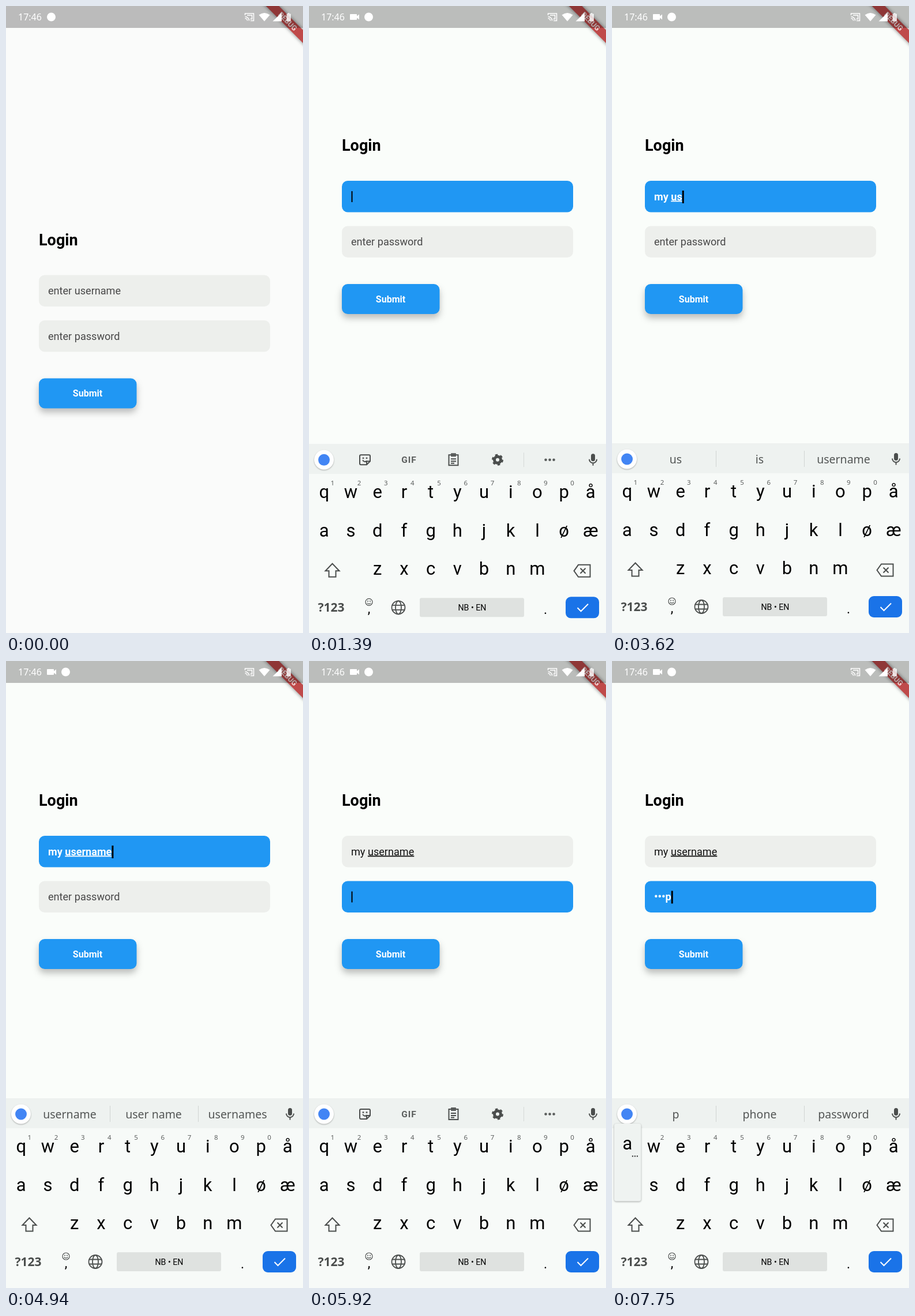
An HTML page that plays this animation: 515 by 1087 pixels, repeating every 8 s.

```html
<!DOCTYPE html>
<html lang="en">
<head>
<meta charset="utf-8">
<title>Login form</title>
<style>
  html, body { margin: 0; width: 100%; height: 100%; overflow: hidden; background: #fafbfa; }
  svg { display: block; width: 100vw; height: 100vh; }
  text { font-family: Roboto, sans-serif; white-space: pre; }
  .noto { font-family: "Noto Sans", sans-serif; }
  .mid { text-anchor: middle; }
  .bold { font-weight: 700; }
  .line { fill: none; stroke: #4b4e4d; stroke-width: 2; }
  .hint { fill: #484848; font-size: 18.1px; }
  .entry { font-size: 18.1px; }
  .under { text-decoration: underline; text-decoration-thickness: 1px; }
  .raised { filter: drop-shadow(0 7px 6px rgba(0, 0, 0, .25)); }
  .popup { filter: drop-shadow(0 1.5px 1.5px rgba(0, 0, 0, .35)); }
</style>
</head>
<body>
<svg viewBox="0 0 515 1087" preserveAspectRatio="none">
  <rect id="page" width="515" height="1087"/>

  <g id="form">
    <text class="bold" x="57" y="414.5" font-size="27">Login</text>
    <g id="fields"></g>
    <rect class="raised" x="57" y="645.5" width="169.5" height="52" rx="10" fill="#2097f3"/>
    <text class="bold mid" x="141.5" y="677" font-size="16" fill="#fff">Submit</text>
  </g>

  <g transform="translate(488.5 26.5) rotate(45)">
    <rect x="-70" y="-8" width="140" height="16" fill="#bf4a4a" style="filter:drop-shadow(0 0 3px rgba(0,0,0,.5))"/>
    <text class="bold mid" y="4.5" font-size="12.5" fill="#f4e4e4">DEBUG</text>
  </g>

  <rect width="515" height="38" fill="#000" fill-opacity=".255"/>
  <g fill="#fff">
    <text class="noto" x="21" y="25" font-size="16">17:46</text>
    <path id="camera" d="M72 14h10q1 0 1 1v2.500l4-3v9l-4-3v2.500q0 1-1 1h-10q-1 0-1-1v-8q0-1 1-1z"/>
    <circle id="badge" cy="19" r="7.500"/>
    <path d="M414.500 16v-3h15v12.500h-5.500M414.500 18.500a7 7 0 0 1 7 7M414.500 21.500a4 4 0 0 1 4 4M418 16h8.500v6.500h-3" fill="none" stroke="#fff" stroke-width="1.500"/>
    <path d="M438.500 15.500q9.500-7 19 0l-9.500 11z"/>
    <path d="M478 11.500v15h-15.500z"/>
    <path d="M486.500 13.500h2v-1.500h3v1.500h2.500v13h-7.500z" fill-opacity=".8"/>
  </g>

  <g id="keyboard">
    <rect y="758" width="515" height="340" fill="#f7faf8"/>
    <rect y="758" width="515" height="52" fill="#eef2f0"/>
    <circle cx="26" cy="785.500" r="17" fill="#fff" style="filter:drop-shadow(0 1px 1px rgba(0,0,0,.3))"/>
    <circle cx="26" cy="785.500" r="10" fill="#4285f4"/>
    <g fill="#4b4e4d">
      <rect x="489" y="775" width="7" height="13" rx="3.500"/>
      <path class="line" d="M486 784.500a6.500 6.500 0 0 0 13 0M492.500 791v4.500"/>
    </g>

    <g id="tools" fill="#5a5d5c">
      <path class="line" d="M90 777h14q2 0 2 2v9l-6 6h-10q-2 0-2-2v-13q0-2 2-2zM106 788h-6v6M93 786q4 5 7 1"/>
      <circle cx="94" cy="782.500" r="1.500"/><circle cx="100" cy="782.500" r="1.500"/>
      <text class="bold mid" x="173.500" y="791" font-size="15.500" letter-spacing="1">GIF</text>
      <path class="line" d="M242.500 777h16v18h-16zM246 784h9M246 788h9M246 791.500h6"/>
      <rect x="246" y="774" width="9" height="6" rx="1"/>
      <circle class="line" cx="327" cy="785.500" r="5.500" style="stroke-width:5"/>
      <circle class="line" cx="327" cy="785.500" r="8.500" stroke-dasharray="4.450" style="stroke-width:3"/>
      <path d="M372.500 773v25" stroke="#d5d8d7"/>
      <circle cx="410.500" cy="785.500" r="2.300"/><circle cx="417.500" cy="785.500" r="2.300"/><circle cx="424.500" cy="785.500" r="2.300"/>
    </g>

    <g id="words" class="noto mid" font-size="19.500" fill="#535655">
      <path d="M180.500 771v28M333.500 771v28" stroke="#d0d4d2"/>
    </g>

    <g id="keys"></g>

    <path class="line" d="M40.500 965.500l12 12.500h-6v10.500h-12v-10.500h-6z"/>
    <path class="line" d="M467 967.500h20.500v21h-20.500l-7.500-10.500zM470.500 973.500l9 9M479.500 973.500l-9 9"/>
    <text class="noto" x="15.500" y="1049" font-size="21" font-weight="600" fill="#4b4e4d">?123</text>
    <g fill="#4b4e4d">
      <circle class="line" cx="104" cy="1032" r="6" style="stroke-width:1.200"/>
      <circle cx="102" cy="1030.500" r="1"/><circle cx="106" cy="1030.500" r="1"/>
      <path class="line" d="M101 1033.500q3 3.500 6 0" style="stroke-width:1.200"/>
    </g>
    <text class="mid" x="104" y="1052" font-size="23">,</text>
    <text class="mid" x="410" y="1053" font-size="23">.</text>
    <g class="line" style="stroke-width:1.800">
      <circle cx="155" cy="1041.500" r="11.500"/>
      <ellipse cx="155" cy="1041.500" rx="5" ry="11.500"/>
      <path d="M144.500 1037.500h21M144.500 1045.500h21"/>
    </g>
    <rect x="192" y="1025" width="181" height="33" rx="3" fill="#dfe2e0"/>
    <text class="mid" x="283" y="1047" font-size="14.200">NB • EN</text>
    <rect x="445" y="1023" width="58" height="37" rx="9" fill="#1a73e8"/>
    <path d="M465.500 1042l6 6 12.500-12.500" fill="none" stroke="#fff" stroke-width="2"/>

    <g id="popup">
      <rect class="popup" x="-23" y="-45" width="46.500" height="134.500" rx="4" fill="#eff3f1"/>
      <text class="mid" font-size="31"></text>
      <path d="M8 11.500h2M12 11.500h2M16 11.500h2" stroke="#222" stroke-width="2"/>
    </g>
  </g>
</svg>

<script>
const LOOP = 8000, TAP_USER = 1200, RESIZE = 1260, TAP_PASS = 5620;
const LIFT = 163.5, GREY = [237, 239, 236], BLUE = [32, 151, 243];

// time, username, password, pressed key, suggestions ("tools" shows the icon strip)
const STATES = [
  [0, '', '', '', 'tools'],
  [1920, '', '', 'm', 'tools'],
  [2140, 'm', '', '', 'm,my,men'],
  [2500, 'm', '', 'y', 'm,my,men'],
  [2760, 'my ', '', '', 'name,phone,own'],
  [3190, 'my u', '', 's', 'u,I,is'],
  [3620, 'my us', '', '', 'us,is,username'],
  [3900, 'my us', '', 'e', 'us,is,username'],
  [4140, 'my user', '', 'n', 'user,username,users'],
  [4430, 'my usern', '', 'a', 'username,usern,usernames'],
  [4610, 'my userna', '', '', 'username,userna,usernames'],
  [4740, 'my usernam', '', '', 'username,usernam,usernames'],
  [4870, 'my username', '', '', 'username,user name,usernames'],
  [5620, 'my username', '', '', ''],
  [5860, 'my username', '', '', 'tools'],
  [6430, 'my username', '', 'm', 'tools'],
  [6760, 'my username', '•', 'y', 'm,my,men'],
  [7070, 'my username', '•y', '', 'my,mye,myself'],
  [7300, 'my username', '•••', 'p', 'name,phone,own'],
  [7690, 'my username', '•••p', 'a', 'p,phone,password'],
];

const $ = id => document.getElementById(id);
const clamp = v => Math.max(0, Math.min(1, v));
const progress = (t, start, duration) => clamp((t - start) / duration);
const add = (parent, markup) => parent.insertAdjacentHTML('beforeend', markup);
const show = (node, on) => { node.style.display = on ? '' : 'none'; };
const mix = k => `rgb(${GREY.map((c, i) => Math.round(c + (BLUE[i] - c) * k))})`;

const keyAt = {};
['qwertyuiopå', 'asdfghjkløæ', '  zxcvbnm'].forEach((row, r) => [...row].forEach((key, i) => {
  if (key === ' ') return;
  const x = 26.3 + 46.2 * i, y = 852 + 66.6 * r;
  keyAt[key] = [x, y];
  add($('keys'), `<text class="mid" x="${x}" y="${y}" font-size="31">${key}</text>`);
  if (r === 0 && i < 10) {
    add($('keys'), `<text class="noto mid" x="${x + 14.5}" y="830" font-size="11.5" font-weight="500" fill="#5a5d5c">${(i + 1) % 10}</text>`);
  }
}));

const words = [110.5, 256, 401.5].map(x => {
  add($('words'), `<text class="noto" x="${x}" y="793">-</text>`);
  return $('words').lastElementChild;
});

function makeField(y, hint) {
  add($('fields'), `<g>
    <rect x="57" y="${y}" width="401" height="54.5" rx="10"/>
    <text class="hint" x="73" y="${y + 33.5}">${hint}</text>
    <text class="entry" x="73" y="${y + 33.5}"><tspan></tspan><tspan class="under"></tspan></text>
    <rect/></g>`);
  const [box, label, entry, cursor] = $('fields').lastElementChild.children;
  return (value, focused, glow, underline) => {
    box.setAttribute('fill', mix(glow));
    show(label, !value && !focused);
    const split = underline ? value.lastIndexOf(' ') + 1 : value.length;
    entry.children[0].textContent = value.slice(0, split);
    entry.children[1].textContent = value.slice(split);
    entry.style.fontWeight = focused ? 700 : 400;
    entry.style.fill = focused ? '#fff' : '#111';
    show(cursor, focused);
    const size = value ? [3, 22, 17] : [2, 19, 18];
    cursor.setAttribute('x', 73 + (value ? entry.getComputedTextLength() : 0.5));
    cursor.setAttribute('width', size[0]);
    cursor.setAttribute('height', size[1]);
    cursor.setAttribute('y', y + size[2]);
  };
}
const drawUser = makeField(466.5, 'enter username');
const drawPass = makeField(545, 'enter password');

function render(t) {
  const [, user, pass, key, strip] = STATES.findLast(s => s[0] <= t);

  $('page').setAttribute('fill', t < TAP_USER ? '#fafbfa' : '#fafdfa');
  const arrive = progress(t, 70, 300);
  $('camera').setAttribute('opacity', arrive);
  $('badge').setAttribute('cx', 78.5 + 25 * arrive);

  $('form').setAttribute('transform', `translate(0 ${t < RESIZE ? 0 : -LIFT})`);
  const toUser = progress(t, TAP_USER, 190), toPass = progress(t, TAP_PASS + 20, 200);
  drawUser(user, t >= TAP_USER && t < TAP_PASS, toUser - toPass, true);
  drawPass(pass, t >= TAP_PASS, toPass, false);

  const below = 330 * (1 - progress(t, 1210, 215)) ** 3;
  $('keyboard').setAttribute('transform', `translate(0 ${below})`);
  show($('keyboard'), t >= 1210);
  show($('tools'), strip === 'tools');
  const list = strip.includes(',') ? strip.split(',') : [];
  show($('words'), list.length);
  words.forEach((word, i) => { word.textContent = list[i] || ''; });

  show($('popup'), key);
  if (key) {
    const [x, y] = keyAt[key];
    $('popup').setAttribute('transform', `translate(${x + 0.5} ${y - 71.5})`);
    $('popup').children[1].textContent = key;
  }
}

const start = performance.now();
(function tick() {
  render((performance.now() - start) % LOOP);
  requestAnimationFrame(tick);
})();
</script>
</body>
</html>
```
